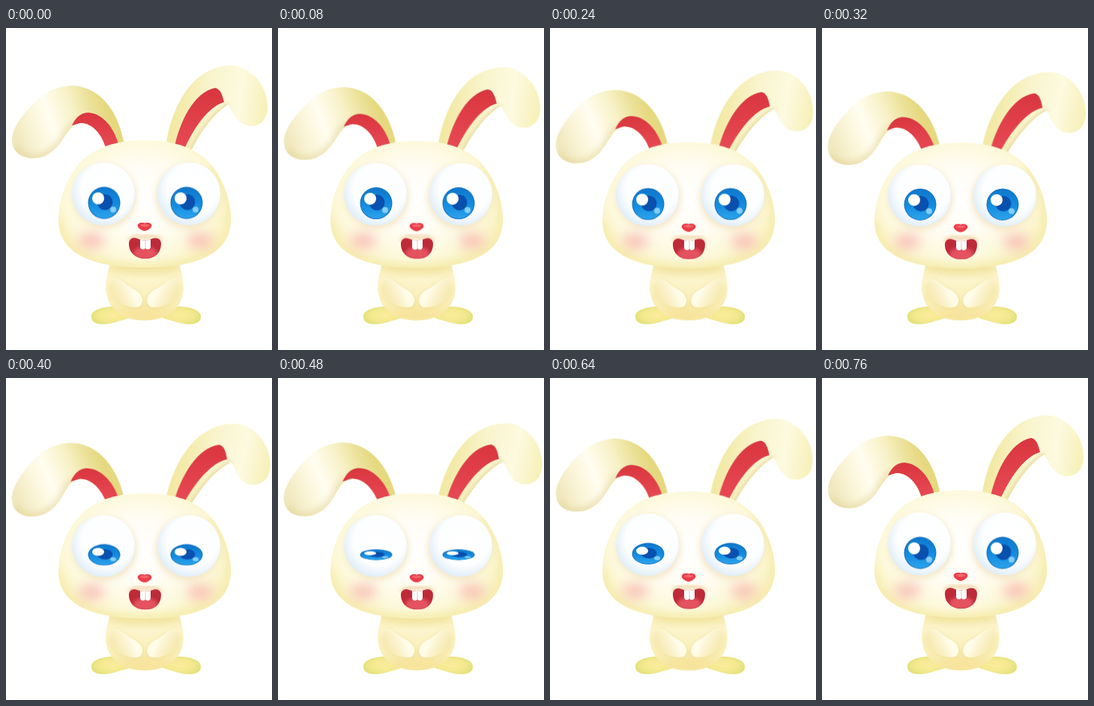
Animation of 355 by 430 pixels, one loop 800 ms. Source, as an HTML page:

```html
<!DOCTYPE html>
<html lang="en">
<head>
<meta charset="utf-8">
<title>Blinking rabbit</title>
<style>
  html, body { margin: 0; width: 100%; height: 100%; overflow: hidden; background: #fff; }
  svg { display: block; width: 355px; height: 430px; }

  .squash, .ear { animation: 800ms infinite; }
  .squash { transform-origin: 185px 390px; animation-name: squash; }
  .ear { animation-name: droop; }
  .ear.l { --turn: -4.3deg; transform-origin: 150px 158px; }
  .ear.r { --turn: 4.4deg; transform-origin: 225px 160px; }
  .iris { animation: blink 800ms infinite; }

  @keyframes squash {
    0% { transform: none; animation-timing-function: steps(11); }
    55% { transform: scaleY(.9815); animation-timing-function: steps(8); }
    95%, 100% { transform: none; }
  }
  @keyframes droop {
    0% { transform: rotate(0deg); animation-timing-function: steps(11); }
    55% { transform: rotate(var(--turn)); animation-timing-function: steps(8); }
    95%, 100% { transform: rotate(0deg); }
  }
  @keyframes blink {
    0% { transform: scaleY(1); }
    40% { transform: scaleY(1); animation-timing-function: steps(5); }
    65% { transform: scaleY(.18); animation-timing-function: steps(5); }
    90%, 100% { transform: scaleY(1); }
  }
</style>
</head>
<body>
<svg viewBox="0 0 355 430">
  <defs>
    <filter id="b2" x="-50%" y="-50%" width="200%" height="200%"><feGaussianBlur stdDeviation="2"/></filter>
    <filter id="b5" x="-50%" y="-50%" width="200%" height="200%"><feGaussianBlur stdDeviation="5"/></filter>
    <filter id="b8" x="-60%" y="-60%" width="220%" height="220%"><feGaussianBlur stdDeviation="8"/></filter>

    <linearGradient id="earL" gradientUnits="userSpaceOnUse" x1="20" y1="165" x2="140" y2="125">
      <stop offset="0" stop-color="#f1e8bf"/><stop offset=".2" stop-color="#faf5d8"/>
      <stop offset=".4" stop-color="#fffdf0"/><stop offset=".65" stop-color="#f8f2c8"/>
      <stop offset=".87" stop-color="#ebe096"/><stop offset="1" stop-color="#e5d87e"/>
    </linearGradient>
    <linearGradient id="earR" gradientUnits="userSpaceOnUse" x1="225" y1="110" x2="345" y2="125">
      <stop offset="0" stop-color="#f2e9a4"/><stop offset=".35" stop-color="#f9f4cc"/>
      <stop offset=".7" stop-color="#fdfae0"/><stop offset="1" stop-color="#f7f0b8"/>
    </linearGradient>
    <linearGradient id="pink" x1="0" y1="0" x2="0" y2="1">
      <stop offset="0" stop-color="#d9363f"/><stop offset="1" stop-color="#e84a55"/>
    </linearGradient>
    <radialGradient id="head" gradientUnits="userSpaceOnUse" cx="180" cy="228" r="122" gradientTransform="matrix(1 0 0 .8 0 45)">
      <stop offset="0" stop-color="#fff"/><stop offset=".45" stop-color="#fffdf4"/>
      <stop offset=".8" stop-color="#fdf9dc"/><stop offset="1" stop-color="#faf2c0"/>
    </radialGradient>
    <radialGradient id="ball" cx=".56" cy=".42" r=".58">
      <stop offset="0" stop-color="#fff"/><stop offset=".7" stop-color="#fdfeff"/>
      <stop offset="1" stop-color="#e2eff9"/>
    </radialGradient>
    <linearGradient id="blue" x1="0" y1="0" x2="0" y2="1">
      <stop offset="0" stop-color="#0f78cc"/><stop offset=".5" stop-color="#128ade"/>
      <stop offset="1" stop-color="#2ba3ec"/>
    </linearGradient>
    <linearGradient id="body" x1="0" y1="0" x2="0" y2="1">
      <stop offset="0" stop-color="#f6eaac"/><stop offset=".3" stop-color="#fcf5cc"/>
      <stop offset="1" stop-color="#f8eba8"/>
    </linearGradient>
    <linearGradient id="sleeve" gradientUnits="userSpaceOnUse" x1="134" y1="366" x2="168" y2="350">
      <stop offset="0" stop-color="#faf1bf" stop-opacity="0"/><stop offset="1" stop-color="#fffcea"/>
    </linearGradient>
    <radialGradient id="foot" cx=".55" cy=".5" r=".55">
      <stop offset="0" stop-color="#fbec9c"/><stop offset=".6" stop-color="#f4e990"/>
      <stop offset="1" stop-color="#e4e27c"/>
    </radialGradient>

    <path id="pathL" d="M133 160C128 142 115 127 100 127C84 128 80 147 67 160C58 169 48 174 36 174C17 173 8 163 8 149C8 133 24 112 44 94C58 82 74 77 90 77C126 79 150 112 157 152Z"/>
    <path id="pathR" d="M214 154C220 112 245 50 302 50C328 52 349 78 349 105C349 122 340 131 326 131C309 130 303 113 297 102C280 112 262 134 247 164Z"/>
    <path id="skull" d="M185 150C225 150 255 160 275 184C290 203 300 230 300 256C300 301 255 320 185 320C115 320 70 301 70 256C70 230 80 203 95 184C115 160 145 150 185 150Z"/>
    <path id="torso" d="M139 312C137 324 133 334 133 347C134 374 154 390.500 185 390.500C216 390.500 236 374 237 347C237 334 233 324 231 312Z"/>
    <path id="arm" d="M140 336C150 328 160 345 173 350C183 356 185 367 178 372C166 376 148 367 141 359C135 352 135 342 140 336Z"/>
    <path id="sole" d="M114 386C113 378 125 373 140 372C158 371 168 380 165 387C152 391 140 396 128 395.500C119 395 114 392 114 386Z"/>
    <path id="lips" d="M164 288C164 281 170 279 175 281Q185 286 196 281C202 279 207 282 207 288C207 301 198 308 186 308C173 308 164 300 164 288Z"/>
    <clipPath id="clipL"><use href="#pathL"/></clipPath>
    <clipPath id="clipR"><use href="#pathR"/></clipPath>
    <clipPath id="clipHead"><use href="#skull"/></clipPath>
    <clipPath id="clipBody"><use href="#torso"/></clipPath>
    <clipPath id="clipMouth"><use href="#lips"/></clipPath>

    <g id="iris">
      <circle r="21.5" fill="#1670bd"/>
      <circle r="20.500" fill="url(#blue)"/>
      <circle cx="1" cy="-1" r="10.500" fill="#0a50ae"/>
      <circle cx="-8" cy="-6" r="8" fill="#fff"/>
      <circle cx="12" cy="9" r="4" fill="#84cdf8"/>
    </g>
  </defs>

  <use href="#sole" fill="url(#foot)"/>
  <use href="#sole" fill="url(#foot)" transform="matrix(-1 0 0 1 374 0)"/>

  <g class="squash">
    <g class="ear l">
      <use href="#pathL" fill="url(#earL)"/>
      <g clip-path="url(#clipL)">
        <path d="M10 160C22 180 48 178 67 160C80 147 84 128 100 127" fill="none" stroke="#dccb86" stroke-width="8" opacity=".6" filter="url(#b5)"/>
        <path d="M88 130C94 118 101 113 110 113C129 114 144 133 150 155L133 161C128 142 115 127 100 127Z" fill="url(#pink)"/>
      </g>
    </g>

    <g class="ear r">
      <use href="#pathR" fill="url(#earR)"/>
      <g clip-path="url(#clipR)">
        <path d="M297 102C280 112 262 134 247 164" fill="none" stroke="#e3d594" stroke-width="5" opacity=".8" filter="url(#b2)"/>
        <path d="M225 158C232 126 250 86 279 80C286 81 289 90 291 99C270 105 250 134 237 164Z" fill="url(#pink)"/>
      </g>
    </g>

    <use href="#torso" fill="url(#body)"/>
    <g clip-path="url(#clipBody)">
      <ellipse cx="185" cy="318" rx="46" ry="9" fill="#eedd90" opacity=".6" filter="url(#b5)"/>
      <ellipse cx="185" cy="382" rx="38" ry="10" fill="#f6dc8c" opacity=".6" filter="url(#b8)"/>
      <g id="limb">
        <use href="#arm" fill="#efd98c" opacity=".55" transform="translate(1 1)" filter="url(#b2)"/>
        <use href="#arm" fill="url(#sleeve)"/>
      </g>
      <use href="#limb" transform="matrix(-1 0 0 1 370.5 0)"/>
    </g>

    <use href="#skull" fill="url(#head)"/>
    <g clip-path="url(#clipHead)">
      <path d="M275 184C290 203 300 230 300 256C300 301 255 320 185 320C115 320 70 301 70 256" fill="none" stroke="#f3e79e" stroke-width="8" opacity=".65" filter="url(#b5)"/>
      <g fill="#ecd5a4" opacity=".6" filter="url(#b5)">
        <circle cx="132" cy="225" r="42"/>
        <circle cx="242" cy="225" r="42"/>
      </g>
      <g fill="#f8b4b0" opacity=".8" filter="url(#b8)">
        <ellipse cx="114" cy="284" rx="17" ry="10"/>
        <ellipse cx="259" cy="284" rx="17" ry="10"/>
      </g>
      <path d="M164 284Q170 276 185 279Q201 276 207 284" fill="none" stroke="#efca98" stroke-width="5" opacity=".7" filter="url(#b2)"/>
    </g>

    <circle cx="130" cy="221.5" r="42" fill="url(#ball)"/>
    <circle cx="244" cy="221.5" r="42" fill="url(#ball)"/>
    <g transform="translate(131 233.5)"><use class="iris" href="#iris"/></g>
    <g transform="translate(241 233.5)"><use class="iris" href="#iris"/></g>

    <path d="M176 262.500C178 259.500 182 260 185 260.500C188 260 192 259.500 194 262.500C196 266 189 271 185 271C181 271 174 266 176 262.500Z" fill="#e93d48"/>
    <ellipse cx="185" cy="263.500" rx="6" ry="2" fill="#f9747a" opacity=".7"/>

    <use href="#lips" fill="#bf2a39"/>
    <g clip-path="url(#clipMouth)">
      <ellipse cx="186" cy="301" rx="16" ry="9" fill="#e4525f" filter="url(#b2)"/>
      <path d="M179 281H193V292Q193 295 190 295.500Q187.500 296 186 294Q184.500 296 182 295.500Q179 295 179 292Z" fill="#fff"/>
      <path d="M186 284V294" stroke="#e3c4c0"/>
    </g>
  </g>
</svg>
</body>
</html>
```
